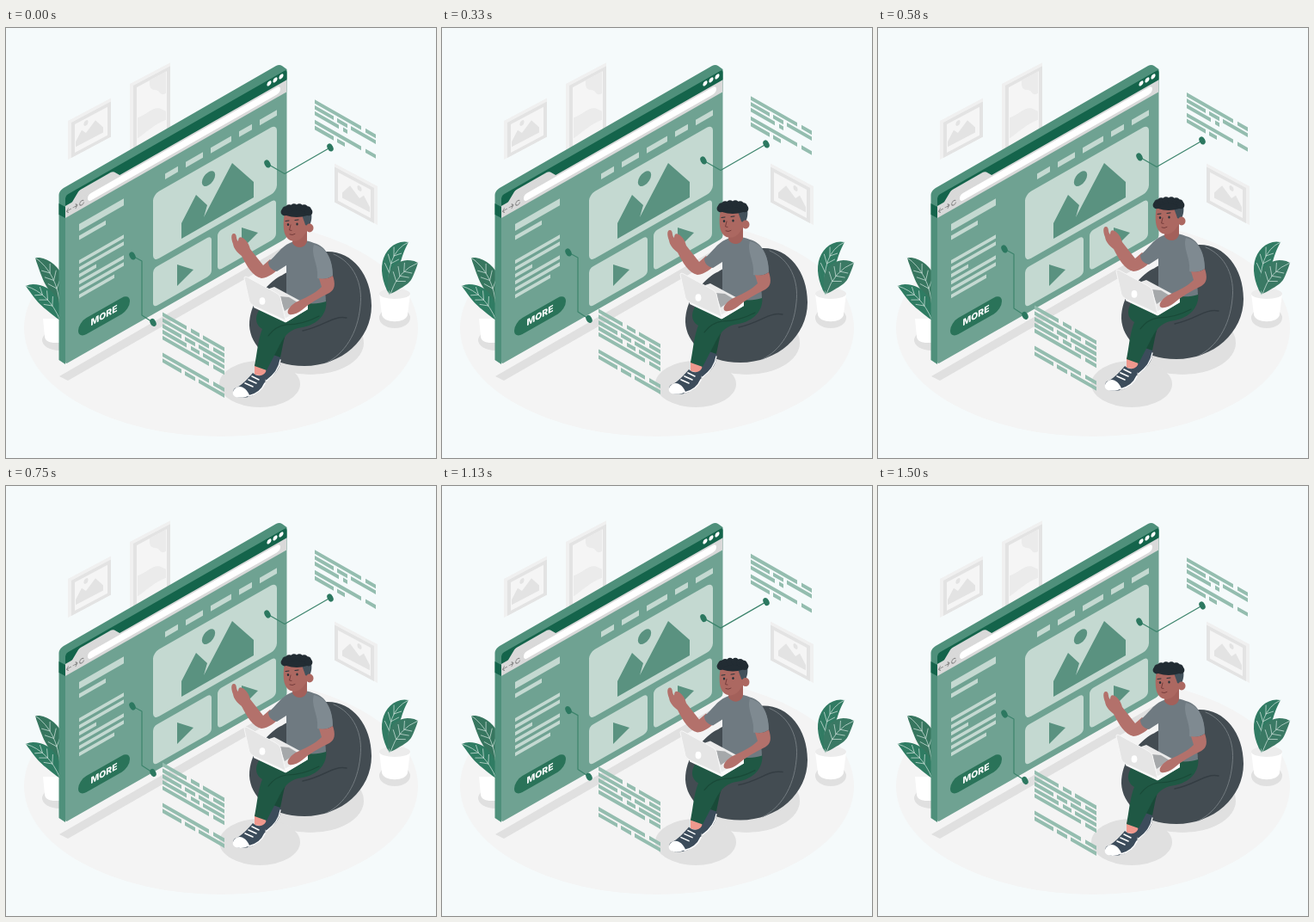
An HTML page for the animation above (1.54 s loop, 500x500 px).

```html
<!DOCTYPE html>
<html lang="en">
<head>
<meta charset="utf-8">
<title>Browser scene</title>
<style>
html, body { margin: 0; width: 100%; height: 100%; overflow: hidden; background: #f5fafb; }
svg { display: block; width: 100vw; height: 100vh; }
.line { fill: none; stroke-linecap: round; stroke-linejoin: round; }
</style>
</head>
<body>
<svg viewBox="0 0 500 500" xmlns="http://www.w3.org/2000/svg">
  <ellipse cx="250" cy="349" rx="229" ry="126" fill="#f4f4f4"/>
  <g id="walls"></g>

  <g id="shadows" fill="#e0e0e0">
    <path d="M62 405L72 410L330 262L320 256Z"/>
    <ellipse cx="62" cy="363" rx="20" ry="12"/>
    <ellipse cx="452" cy="337" rx="18" ry="12"/>
    <ellipse cx="354" cy="366" rx="62" ry="37"/>
    <ellipse cx="295" cy="414" rx="47" ry="27"/>
  </g>

  <g id="pots" fill="#fff">
    <path d="M43 338H72V366H58Q45 366 45 358Z"/>
    <path d="M434 309H470L467 333C466 344 438 344 437 333Z"/>
    <ellipse cx="452" cy="309" rx="18" ry="6" fill="#ececec"/>
  </g>
  <g id="plants"></g>

  <!-- window thickness, then its front -->
  <path fill="#4f907b" d="M61.500 194Q62 189 67 186L314 44Q318 42 321 44L326.500 48V74L69 224V391L61.500 386Z"/>
  <path fill="#14644b" d="M61.500 204L69 208V221L61.500 217Z"/>
  <g id="page" transform="matrix(1 -.57 0 1 0 39.330)"></g>
  <g fill="#5a9280">
    <path d="M204 245V227L221 194L234 206L230 220L263 157L288 179V197Z"/>
    <path id="play" d="M199 275L218 281L199 300Z"/>
    <use href="#play" x="75" y="-43"/>
  </g>

  <g id="float">
    <g id="links" stroke="#3c846c" stroke-width="1.200"></g>
    <g id="notes" stroke="#94bdaf" stroke-width="4.600"></g>

    <!-- bean bag -->
    <path fill="#434c52" d="M283 346C283 320 299 304 312 293C318 288 324 287 330 281C340 266 355 260 374 260C403 260 425 287 425 323C425 362 390 393 347 393C306 393 284 369 283 346Z"/>
    <path class="line" stroke="#737b80" d="M381 263C405 273 415 298 412 323C409 356 393 379 373 389"/>
    <path class="line" stroke="#343d43" stroke-width="1.500" d="M396 337C380 334 370 347 345 352"/>

    <!-- shoes and legs -->
    <path fill="#3c4c5b" d="M308 377L319 382C321 392 314 403 303 410L298 404Z"/>
    <path class="line" stroke="#fff" stroke-width="1.300" d="M319 386Q317 400 303 410"/>
    <path fill="#194a38" d="M306 345H331C323 356 322 370 319 383L305 378Z"/>
    <path fill="#ef988d" d="M289 391L303 395L301 405L289 403Z"/>
    <path fill="#3c4c5b" d="M287 401C291 405 298 406 302 400C302 408 302 414 298 419C292 426 283 430 274 430C264 430 262 423 266 419C274 416 281 408 287 401Z"/>
    <path fill="#fff" d="M268 418C274 415 280 420 283 427C277 431 266 431 264 426C263 423 265 420 268 418Z"/>
    <path class="line" stroke="#fff" stroke-width="1.600" d="M282 428Q296 425 301 413M278 413L287 417M282 409L291 413M286 405L294 409"/>
    <path fill="#1f5844" d="M335 316L372 315C375 333 361 345 345 348C329 350 323 359 317 371L303 398L289 393C292 378 293 362 298 350C288 344 289 331 300 322Z"/>
    <path class="line" stroke="#194a38" stroke-width="1.200" d="M364 335Q345 345 326 345Q313 347 305 358"/>

    <!-- raised arm -->
    <path fill="#b3716b" d="M307 269L299 276L284 257C282 250 279 246 275 244C272 242 270 244 270 248C267 246 269 239 265 239C261 239 262 246 264 251C265 257 269 261 274 265C280 277 287 289 297 291C306 290 313 284 318 279Z"/>

    <!-- torso and head -->
    <path fill="#6f7a81" d="M330 250C337 246 350 246 358 250C372 253 379 268 380 287L367 292C370 302 372 310 372 318C358 323 339 320 326 312L326 276L315 283C308 281 305 277 305 272C314 265 320 254 330 250Z"/>
    <path fill="#7f8a91" d="M358 252C373 255 380 270 380 288C374 292 368 293 362 291C364 276 354 264 358 252Z"/>
    <path fill="#a3605a" d="M334 240L350 233V248C348 257 337 257 333 250Z"/>
    <path fill="#ac6861" d="M324 215C322 226 322 237 326 243C331 250 340 249 345 243L353 232L351 213Z"/>
    <path fill="#42515b" d="M344 214H355C356 221 355 226 352 231L348 229C347 224 344 220 344 214Z"/>
    <ellipse cx="353" cy="232.500" rx="4.500" ry="5" fill="#ac6861"/>
    <g id="hair" fill="#222c33"><ellipse cx="338" cy="214" rx="16" ry="6"/></g>
    <g fill="#263238">
      <ellipse cx="328" cy="228.500" rx="1.200" ry="1.500"/>
      <ellipse cx="338.500" cy="228" rx="1.200" ry="1.500"/>
    </g>
    <path class="line" stroke="#263238" d="M325 224.500L329 224M336 223.500L340 223"/>
    <path class="line" stroke="#753c3b" d="M331 229L329.500 235L332 235.500M330 240Q333 241.500 336 239.500"/>

    <!-- laptop -->
    <path fill="#ebebeb" d="M306 303L312 301L351 322V327L326 342L319 339Z"/>
    <path fill="#a5a8aa" d="M318 312L329 313L339 319L324 329Z"/>
    <path fill="#fafafa" d="M324 338L351 322V327L325 342.500L288 325V322Z"/>
    <path fill="#e5e5e5" stroke="#f7f7f7" d="M277 291Q277 288 281 290L314 308Q318 310 319 313L325 340L288 323Q284 321 283 318Z"/>
    <ellipse cx="298" cy="317.500" rx="3.400" ry="4.300" fill="#fff"/>

    <!-- typing arm -->
    <path fill="#b3716b" d="M364 291Q373 293 380 288C383 297 383 304 376 308C364 314 353 320 344 328C339 332 331 335 328 332C326 328 332 321 339 318C350 313 360 308 367 301Z"/>
  </g>
</svg>
<script>
const $ = id => document.getElementById(id);
const PALE = '#c4d9d1', DARK = '#14644b', GREY = '#e3e3e3';

function add(parent, tag, attrs) {
  const el = document.createElementNS('http://www.w3.org/2000/svg', tag);
  for (const k in attrs) el.setAttribute(k, attrs[k]);
  parent.appendChild(el);
  return el;
}
const box = (parent, x, y, width, height, fill, rx = 0) =>
  add(parent, 'rect', { x, y, width, height, fill, rx });

// A framed picture on a wall; side -1 mirrors it for the other wall.
function picture(x, y, w, h, side) {
  const g = add($('walls'), 'g', { transform: `matrix(${side} -.53 0 1 ${x} ${y})` });
  box(g, -4, -4, w + 4, h + 4, '#f0f0f0');
  box(g, 0, 0, w, h, GREY);
  box(g, 4, 4, w - 8, h - 8, '#f5f5f5');
  return g;
}

function landscape(x, y, side) {
  const g = picture(x, y, 46, 41, side);
  add(g, 'path', { d: 'M5 31V25L12 15L17 21L28 12L37 25V31Z', fill: GREY });
  add(g, 'ellipse', { cx: 17, cy: 9.5, rx: 2.6, ry: 3, fill: GREY });
}

// A leaf swells along a bent midrib from base to tip.
function leaf(base, bend, tip, width, fill) {
  const at = (t, side) => {
    const u = 1 - t;
    const mid = i => u * u * base[i] + 2 * u * t * bend[i] + t * t * tip[i];
    const dir = i => u * (bend[i] - base[i]) + t * (tip[i] - bend[i]);
    const off = side * width * Math.sin(Math.PI * t) ** 0.8 / Math.hypot(dir(0), dir(1));
    return [mid(0) - dir(1) * off, mid(1) + dir(0) * off].map(n => n.toFixed(1)).join(' ');
  };
  const steps = Array.from({ length: 17 }, (_, i) => i / 16);
  const edge = [...steps.map(t => at(t, 1)), ...steps.reverse().map(t => at(t, -1))];
  add($('plants'), 'path', { d: 'M' + edge.join('L') + 'Z', fill });
  let veins = `M${base}Q${bend} ${tip}`;
  for (const t of [0.3, 0.45, 0.6])
    for (const side of [-0.7, 0.7]) veins += `M${at(t, 0)}L${at(t + 0.13, side)}`;
  add($('plants'), 'path', { d: veins, class: 'line', stroke: '#c5dbd3', 'stroke-width': 0.8 });
}

function drawPage() {
  const page = $('page');
  const rect = (...args) => box(page, ...args);
  rect(69, 196, 257.5, 195, '#6fa292', 3);
  rect(69, 195, 257.5, 14, DARK, 3);
  rect(69, 207, 257.5, 14, '#d9d9d9');
  add(page, 'path', { d: 'M76 208L84 199Q85 198 87 198H122Q124 198 126 200L133 208Z', fill: '#d9d9d9' });
  rect(95, 209, 224, 8.5, '#fff', 4.2);
  for (let i = 0; i < 3; i++) add(page, 'circle', { cx: 306 + i * 7, cy: 199.5, r: 2.6, fill: '#fff' });
  add(page, 'path', {
    d: 'M75.500 214h-5m2-2.500l-2 2.500l2 2.500M78 214h5m-2-2.500l2 2.500l-2 2.500M90 212.500a2.500 2.500 0 1 0 .5 2.500',
    class: 'line', stroke: '#858585', 'stroke-width': 0.9
  });

  rect(85, 237, 52, 8, PALE);
  rect(85, 250.5, 31, 5, PALE);
  for (let i = 0; i < 6; i++) rect(85, 279 + i * 8, i === 2 ? 20 : i === 5 ? 41 : 52, 4.3, PALE);

  rect(84, 351, 60, 19, '#2a7359', 9.5);
  add(page, 'text', {
    x: 114, y: 363.4, fill: '#fff', 'text-anchor': 'middle',
    'font-family': 'Inter, Open Sans, sans-serif', 'font-weight': 800, 'font-size': 10.4
  }).textContent = 'MORE';

  let x = 185;
  for (const w of [15, 20, 24, 15, 20]) {
    rect(x, 235.5, w, 6.5, PALE);
    x += w + 9;
  }
  rect(171, 252, 144, 78, PALE, 7);
  for (const left of [171, 246]) rect(left, 338, 68, 45.5, PALE, 5);
  add(page, 'circle', { cx: 235.5, cy: 270, r: 7.7, fill: '#5a9280' });
}

// Text rows are dashed strokes cycling through three word patterns.
const WORDS = ['54 5', '22 4 12 4 34 4', '28 5 10 4'];
function paragraph(x, y, rows, first, width, lastWidth) {
  const g = add($('notes'), 'g', { transform: `matrix(1 .57 0 1 ${x} ${y})` });
  for (let i = 0; i < rows; i++)
    add(g, 'path', {
      d: `M0 ${2.3 + i * 6.8}h${i < rows - 1 ? width : lastWidth}`,
      'stroke-dasharray': WORDS[(first + i) % 3]
    });
}

// A connector with a tilted dot at each end.
function link(...points) {
  add($('links'), 'polyline', { points: points.join(' '), class: 'line' });
  for (const [x, y] of [points[0], points.at(-1)])
    add($('links'), 'ellipse', {
      cx: x, cy: y, rx: 3.3, ry: 4.8, fill: '#2c7860', stroke: 'none', transform: `rotate(-28 ${x} ${y})`
    });
}

landscape(76, 110, 1);
landscape(428, 186, -1);
add(picture(148, 67, 43, 90, 1), 'path', {
  d: 'M19 4C18 20 28 16 31 25Q34 30 38 29V4ZM5 40C18 42 22 36 31 43L38 50V60C25 58 18 62 5 64Z', fill: '#ebebeb'
});

leaf([63, 325], [60, 285], [34, 267], 11, '#37765f');
leaf([63, 340], [50, 308], [23, 300], 10, '#2f7c63');
leaf([446, 310], [440, 262], [468, 249], 10, '#317b63');
leaf([447, 309], [456, 282], [479, 273], 13, '#3a7964');

drawPage();
link([304, 158], [324, 169.5], [377, 139]);
link([147, 265], [158, 271], [158, 334], [171, 342.5]);
paragraph(359, 83.2, 3, 0, 71, 38);
paragraph(359, 106.8, 2, 0, 71, 35);
paragraph(182, 330.5, 5, 2, 72, 72);
paragraph(182, 377.5, 2, 0, 72, 72);

for (let i = 0; i < 8; i++) {
  const a = Math.PI * i / 7;
  add($('hair'), 'circle', { cx: 338 - 14 * Math.cos(a), cy: 214 - 5.5 * Math.sin(a), r: 4.4 });
}

const LOOP = 1540, LIFT = 9, LEAD = 30;

function draw(ms) {
  const phase = (ms + LEAD) % LOOP / LOOP * 2 * Math.PI;
  const y = -LIFT * (1 - Math.cos(phase)) / 2;
  $('float').setAttribute('transform', `translate(0 ${y.toFixed(3)})`);
}

const start = performance.now();
function tick() {
  draw(performance.now() - start);
  requestAnimationFrame(tick);
}
tick();
</script>
</body>
</html>
```
